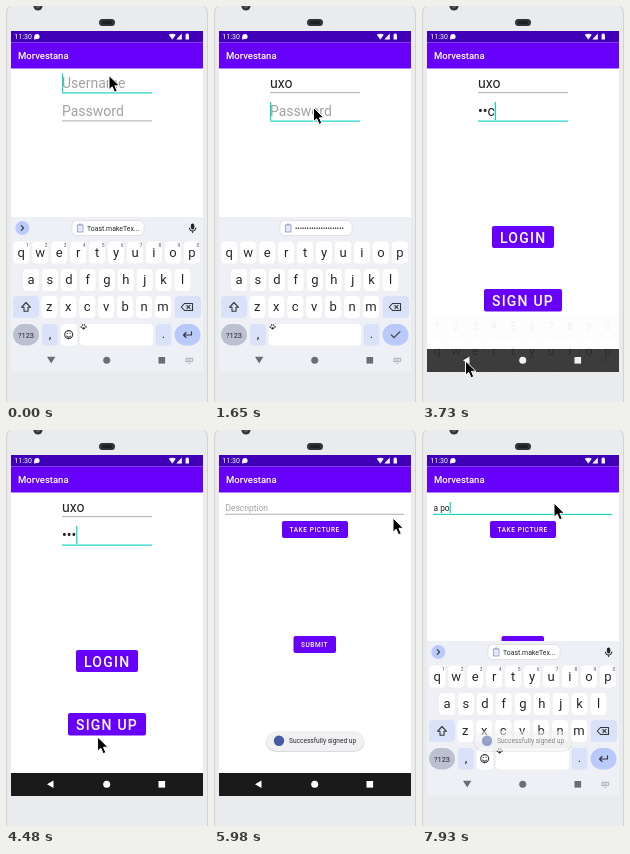
These frames come from a looping animation (202 by 396 pixels, 8 s). An HTML page:

```html
<!DOCTYPE html>
<html lang="en">
<head>
<meta charset="utf-8">
<title>Sign-up demo</title>
<style>
html, body { margin: 0; width: 100%; height: 100%; overflow: hidden; background: #fff; }
svg { display: block; width: 100vw; height: 100vh; }
text { font-family: Roboto, "Noto Sans", sans-serif; white-space: pre; }
.mid { text-anchor: middle; }
.field { font-size: 14px; fill: #202020; }
.small { font-size: 8.4px; fill: #202020; }
.hint { fill: #a2a2a2; }
.btn { fill: #6700fa; }
.cap { fill: #fff; font-weight: 500; font-size: 14px; letter-spacing: 1.22px; }
.cap.sm { font-size: 6.5px; letter-spacing: .58px; }
.key { fill: #fff; }
.tint { fill: #dae2fa; }
.accent { fill: #b9cafa; }
.letter { font-size: 13px; fill: #25262a; }
.digit { font-size: 5px; fill: #55575e; }
.row { font-size: 10px; fill: #55575e; }
.icon { fill: none; stroke: #33353b; stroke-width: 1.1; stroke-linejoin: round; stroke-linecap: round; }
</style>
</head>
<body>
<svg viewBox="0 0 202 396" preserveAspectRatio="none">
  <defs>
    <clipPath id="screen"><rect x="5" y="25" width="192" height="341"/></clipPath>
  </defs>

  <path d="M0 0H202V396H0Z" fill="#e9ebed"/>
  <path d="M.5 396V8Q.5 3 4 0M201.5 396V8Q201.5 3 198 0" fill="none" stroke="#d0d2d5"/>
  <circle cx="32" cy="0" r="4.5" fill="#34363a"/>
  <circle cx="32" cy="0" r="2.2" fill="#55585e"/>
  <rect x="93" y="13" width="16" height="7" rx="3.5" fill="#303236"/>
  <rect x="96" y="15" width="10" height="3" rx="1.5" fill="#1d1e21"/>

  <g clip-path="url(#screen)">
    <rect x="5" y="25" width="192" height="341" fill="#fff"/>

    <g id="login">
      <text class="field hint" id="userHint" x="56" y="82">Username</text>
      <text class="field" id="user" x="56" y="82"></text>
      <rect id="userLine" x="56" width="90"/>
      <text class="field hint" id="passHint" x="56" y="110">Password</text>
      <text class="field" id="pass" x="56" y="110"></text>
      <rect id="passLine" x="56" width="90"/>
      <rect class="btn" x="70" y="220" width="62" height="22" rx="2"/>
      <text class="cap" x="78" y="236.5">LOGIN</text>
      <rect class="btn" id="signUp" x="62" y="283" width="78" height="22.5" rx="2"/>
      <text class="cap" x="70" y="299.5">SIGN UP</text>
    </g>

    <g id="post">
      <rect x="5" y="62" width="192" height="300" fill="#fff"/>
      <text class="small hint" id="descHint" x="11.5" y="81">Description</text>
      <text class="small" id="desc" x="11.5" y="81"></text>
      <rect id="descLine" x="11" width="179"/>
      <rect class="btn" x="68" y="91" width="66" height="17" rx="2"/>
      <text class="cap sm" x="75.5" y="102">TAKE PICTURE</text>
      <rect class="btn" x="79.5" y="206" width="42.5" height="17" rx="2"/>
      <text class="cap sm" x="87" y="217">SUBMIT</text>
    </g>
    <rect id="caret" width="1.2" fill="#03dac5"/>

    <rect x="5" y="25" width="192" height="11.5" fill="#3f00b8"/>
    <rect class="btn" x="5" y="36.5" width="192" height="26"/>
    <text x="8.5" y="33.3" font-size="7" fill="#fff">11:30</text>
    <g fill="#fff">
      <circle cx="31" cy="30.5" r="2.6"/>
      <path d="M28 33.6L28.4 30.5 31 33ZM162.8 28.8Q166.3 26.6 169.8 28.8L166.3 33.4ZM175.8 27.6V33.4H170.4ZM179.6 28.2H180.5V27.4H182V28.2H182.9V33.4H179.6Z"/>
    </g>
    <text x="12" y="53" font-size="9.5" font-weight="500" fill="#fff">Morvestana</text>

    <rect x="5" y="343" width="192" height="23" fill="#1a1a1a"/>
    <path d="M41 354.3L47.5 350.6V358Z" fill="#fff"/>
    <circle cx="100.7" cy="354.3" r="3.5" fill="#fff"/>
    <rect x="152.5" y="351" width="6.6" height="6.6" fill="#fff"/>

    <g id="board">
      <rect x="5" y="211" width="192" height="155" fill="#eff0f5"/>
      <g id="keys"></g>
      <rect class="tint" x="7" y="290" width="26" height="22" rx="4"/>
      <path class="icon" d="M20 296.5L24.5 301.3H22V305.3H18V301.3H15.5Z"/>
      <rect class="tint" x="168.5" y="290" width="26.5" height="22" rx="4"/>
      <path class="icon" d="M178.5 297.5H186.5V304.5H178.5L175.3 301ZM180.8 299.4L184 302.6M184 299.4L180.8 302.6"/>
      <rect x="7" y="318" width="26" height="21.5" rx="10.7" fill="#bcc1d1"/>
      <text class="mid" x="20" y="331.6" font-size="7.5" fill="#25262a">?123</text>
      <rect class="tint" x="36" y="318" width="16" height="21.5" rx="4"/>
      <text class="letter mid" x="44" y="332">,</text>
      <rect class="tint" x="149.5" y="318" width="16" height="21.5" rx="4"/>
      <text class="letter mid" x="157.5" y="332">.</text>
      <rect class="accent" x="168.5" y="318" width="26" height="21.5" rx="10.7"/>
      <rect class="key" id="space" y="318" height="21.5" rx="4"/>
      <g id="paw" fill="#222">
        <ellipse cx="1.6" cy="2.8" rx="1.5" ry="1.1"/>
        <circle cx="-.8" cy="1.6" r=".8"/><circle cx=".6" cy="-.4" r=".8"/>
        <circle cx="2.6" cy="-.5" r=".8"/><circle cx="4" cy="1.4" r=".8"/>
      </g>
      <g id="textKeys">
        <rect class="key" x="55" y="318" width="16" height="21.5" rx="4"/>
        <circle class="icon" cx="62.7" cy="328.6" r="4"/>
        <path class="icon" d="M60.7 330Q62.7 332.2 64.7 330M61.3 327.3V327.4M64.1 327.3V327.4"/>
        <path class="icon" d="M185.5 325.8V329H177.5M180 326.5L177.5 329 180 331.5"/>
        <circle class="accent" cx="16.3" cy="222" r="7"/>
        <path class="icon" d="M15.2 219.6L17.6 222 15.2 224.4"/>
        <rect x="184.9" y="217.4" width="3.4" height="6" rx="1.7" fill="#25262a"/>
        <path class="icon" d="M183.4 222Q183.8 225 186.6 225T189.8 222M186.6 225V226.6"/>
      </g>
      <path class="icon" id="tick" d="M177.2 328.8L180 331.6 186 325.6"/>
      <g id="chip">
        <rect x="66" y="214.5" width="72" height="15" rx="4" fill="#fff" stroke="#dcdde4" stroke-width=".8"/>
        <path d="M71.5 219H77V226H71.5ZM73 219V218H75.5V219" fill="#e6e8fa" stroke="#8e94cb" stroke-width=".8"/>
        <text id="clip" x="81" y="224.6" font-size="6.9" fill="#25262a"></text>
      </g>
      <g id="numbers"></g>
    </g>
    <g id="lightNav">
      <rect x="5" y="343" width="192" height="23" fill="#eff0f5"/>
      <g fill="#6c6e73">
        <path d="M41 350.8H49.4L45.2 357.4Z"/>
        <circle cx="100.7" cy="354.3" r="3.5"/>
        <rect x="152.5" y="351" width="6.6" height="6.6"/>
      </g>
      <path d="M180 352.3H186.6V355.6H180ZM181.4 354H185.2M182.4 357L183.3 358 184.2 357" fill="none" stroke="#9a9ca1" stroke-width=".8"/>
    </g>

    <g id="toast">
      <rect x="51.5" y="302" width="99" height="20" rx="10" fill="#000" opacity=".14"/>
      <rect x="52" y="301" width="98" height="20" rx="10" fill="#f1f1f3"/>
      <circle cx="65" cy="310.7" r="5.2" fill="#475ba6"/>
      <text x="75" y="313.1" font-size="6.6" fill="#2a2a2c">Successfully signed up</text>
    </g>
  </g>

  <path id="mouse" d="M0 0V14.2L3.2 11.3 5.6 16.8 8.3 15.6 5.9 10.3H10.4Z" fill="#000" stroke="#fff" stroke-width="1"/>
</svg>

<script>
const LOOP = 8000;
const $ = id => document.getElementById(id);
const set = (id, attrs) => { for (const k in attrs) $(id).setAttribute(k, attrs[k]); };
const show = (id, on) => { $(id).style.display = on ? "" : "none"; };
const write = (id, s) => { if ($(id).textContent !== s) $(id).textContent = s; };
const ramp = (t, a, b) => Math.min(1, Math.max(0, (t - a) / (b - a)));
const ease = p => p * p * (3 - 2 * p);

// Keyboard letters: characters, first key centre, key top
const rows = [["qwertyuiop", 15.3, 235.5], ["asdfghjkl", 25, 263], ["zxcvbnm", 43.3, 290]];
const digits = "1234567890";
const pitch = 18.95;
$("keys").innerHTML = rows.map(([chars, x0, y]) => [...chars].map((c, i) => {
  const x = x0 + i * pitch;
  return `<rect class="key" x="${x - 8}" y="${y}" width="16" height="22" rx="4"/>` +
    `<text class="letter mid" x="${x}" y="${y + 15}">${c}</text>`;
}).join("")).join("");
$("textKeys").innerHTML += [...digits].map((d, i) =>
  `<text class="digit mid" x="${21.3 + i * pitch}" y="241">${d}</text>`).join("");
$("numbers").innerHTML = [...digits].map((d, i) =>
  `<text class="row mid" x="${15.3 + i * pitch}" y="226">${d}</text>`).join("");

// Pointer stops: time, x, y
const path = [
  [0, 103, 69.5], [900, 103, 69.5], [1350, 99.5, 101.5], [2680, 99.5, 101.5],
  [3430, 43.5, 355], [3730, 43.5, 355], [4780, 103.5, 295], [5230, 103.5, 295],
  [5980, 179, 88], [6130, 179, 88], [6730, 132, 73], [LOOP, 132, 73]
];
function pointer(t) {
  const i = path.findIndex(p => p[0] > t);
  const [ta, xa, ya] = path[i - 1], [tb, xb, yb] = path[i];
  const p = ease(ramp(t, ta, tb));
  return [xa + (xb - xa) * p, ya + (yb - ya) * p];
}

const hold = t => {
  const base = t < 2530 ? 0 : 2530;
  return base + Math.floor((t - base) / 150) * 150;
};
const typed = (s, t, start) => s.slice(0, Math.max(0, Math.floor((t - start) / 150) + 1));

function password(t) {
  const s = typed("vec", t, 2100);
  return t >= 3880 ? "•••" : s && "•".repeat(s.length - 1) + s.slice(-1);
}

function underline(id, y, focused) {
  set(id, { y, height: focused ? 1.2 : .8, fill: focused ? "#1fd6c4" : "#9a9a9a" });
}

function caret(t, field, top, height, blinkFrom) {
  const on = Math.floor(Math.max(0, t - blinkFrom) / 500) % 2 === 0;
  const text = $(field);
  const w = text.textContent ? text.getComputedTextLength() : 0;
  set("caret", { x: +text.getAttribute("x") + w, y: top, height, opacity: on ? 1 : 0 });
}

function render(t) {
  const onPass = t >= 1500, onPost = t >= 5380, onDesc = t >= 6880;
  const user = typed("uxo", t, 450), pass = password(t), desc = typed("a po", t, 7480);

  write("user", user);
  write("pass", pass);
  write("desc", desc);
  show("userHint", !user);
  show("passHint", !pass);
  show("descHint", !desc);
  underline("userLine", 86.3, !onPass);
  underline("passLine", 114.5, onPass);
  underline("descLine", 83.8, onDesc);
  $("signUp").style.fill = t >= 4780 ? "#7d1cff" : "";

  const enter = ramp(t, 5330, 5830);
  show("post", onPost);
  set("post", { opacity: enter, transform: `translate(0 ${14 * (1 - ease(enter))})` });

  show("caret", !onPost || onDesc);
  if (onDesc) caret(t, "desc", 72, 11, t < 7480 ? 6880 : 7930);
  else if (onPass) caret(t, "pass", 96, 18, t < 2100 ? 1500 : 2400);
  else caret(t, "user", 67.5, 18.5, 750);

  const board = onDesc ? ramp(t, 6990, 7400) : 1 - ramp(t, 3280, 3770);
  const textMode = !onPass || onDesc;
  const numberRow = !textMode && t >= 1800;
  set("board", { opacity: board, transform: `translate(0 ${107 * (1 - board)})` });
  set("lightNav", { opacity: board });
  show("textKeys", textMode);
  show("tick", !textMode);
  show("chip", !numberRow);
  show("numbers", numberRow);
  write("clip", textMode ? "Toast.makeTex..." : "•".repeat(21));
  const left = textMode ? 74 : 55;
  set("space", { x: left, width: 147 - left });
  set("paw", { transform: `translate(${left + 2} 319.5)` });

  set("toast", { opacity: ramp(t, 5600, 5900) * (1 - .45 * ramp(t, 7700, 7930)) });
  set("mouse", { transform: `translate(${pointer(t)})` });
}

const start = performance.now();
function tick() {
  render(hold((performance.now() - start) % LOOP));
  requestAnimationFrame(tick);
}
tick();
</script>
</body>
</html>
```
